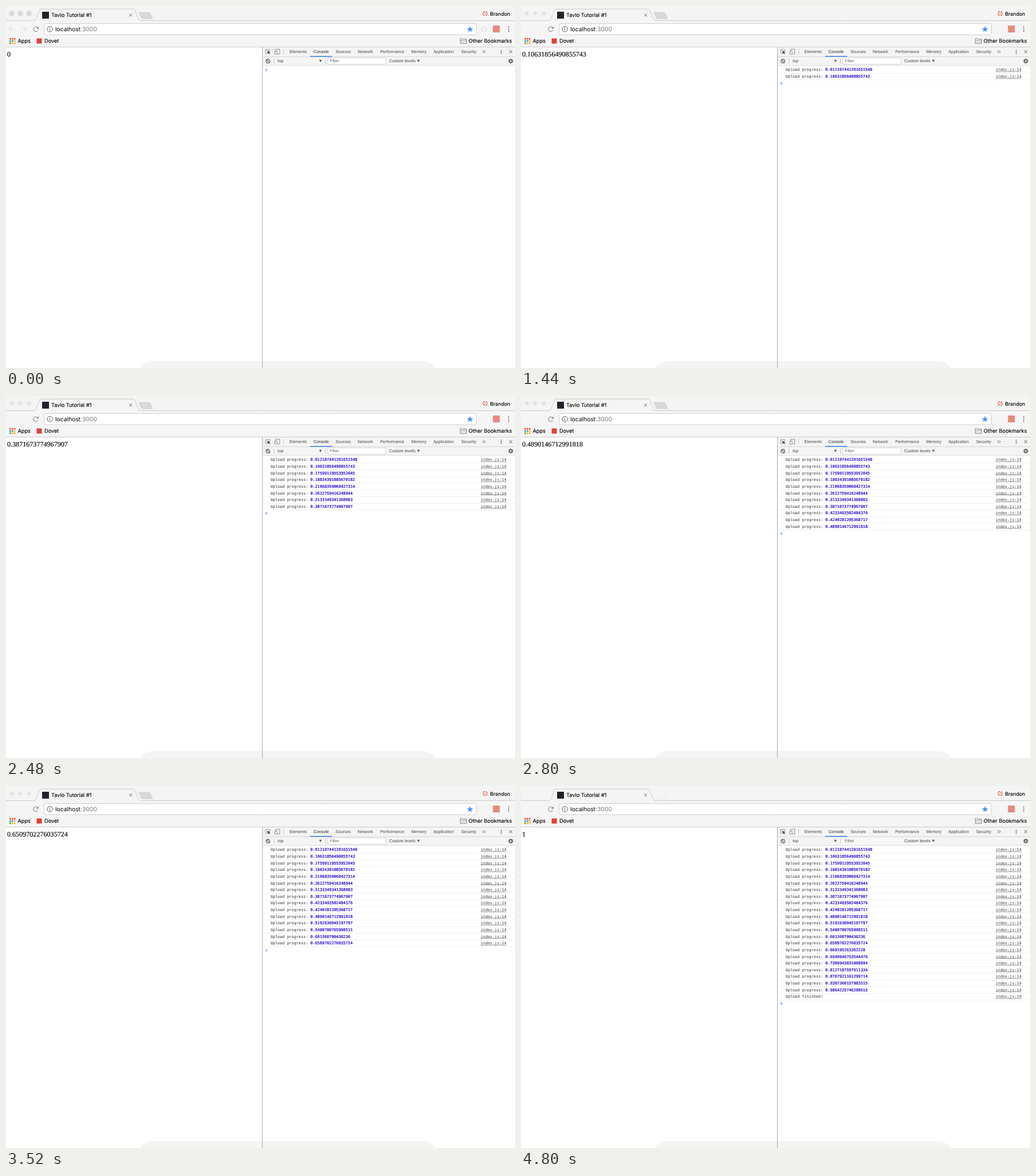
Write an HTML page with a canvas that moves like this. It is 888 px wide and 631 px high and loops after 4.96 s.

```html
<!DOCTYPE html>
<html lang="en">
<head>
<meta charset="utf-8">
<title>Upload progress</title>
<style>
html, body { margin: 0; width: 100%; height: 100%; overflow: hidden; background: #fff; }
canvas, svg { position: absolute; left: 0; top: 0; width: 888px; height: 631px; display: block; }
text { white-space: pre; text-rendering: geometricPrecision; }
.ui { font-family: Inter, sans-serif; font-size: 9.2px; stroke: #000; stroke-width: 0.12px; }
.url { font-family: Inter, sans-serif; font-size: 10.3px; }
.user { font-family: Inter, sans-serif; font-size: 8.8px; stroke: #000; stroke-width: 0.12px; }
.dev { font-family: "Liberation Sans", Arial, sans-serif; font-size: 7.3px; fill: #444; }
.log { font-family: "DejaVu Sans Mono", monospace; font-size: 6.8px; fill: #303030; }
.link { fill: #444; }
.num { fill: #1c00cf; stroke: #1c00cf; stroke-width: 0.22px; }
.page { font-family: "Liberation Serif", Times, serif; font-size: 12.1px; stroke: #000; stroke-width: 0.15px; }
</style>
</head>
<body>
<canvas id="stage"></canvas>
<svg id="words" viewBox="0 0 888 631"></svg>
<script>
const W = 888, H = 631, LOOP = 4960, ROW = 11.636;
const LEAD = 80;      // the page runs ahead of the console for the first two values
const AWAKE = 960, FADE = 3600;

const values = [
  '0.012107441201651548', '0.10631856490855743', '0.17599119553952045', '0.18834391085670182',
  '0.21068359060427314', '0.2622759416248944', '0.3133349341368083', '0.3871673774967907',
  '0.4233493502484376', '0.4240281205368717', '0.4890146712991818', '0.5192630945197797',
  '0.5480780765908511', '0.601360700436236', '0.6509702276035724', '0.669195263362228',
  '0.6949946753544476', '0.7309943031808894', '0.8127187597911334', '0.8767921161299714',
  '0.9387360157983515', '0.9864225746208615', '1'
];
const times = [
  1040, 1440, 1760, 1760, 1840, 2000, 2160, 2480, 2560, 2560, 2800, 2960,
  3120, 3360, 3520, 3600, 3680, 3840, 4080, 4320, 4480, 4640, 4800
];

const canvas = document.getElementById('stage');
const words = document.getElementById('words');
const ctx = canvas.getContext('2d');
const ratio = window.devicePixelRatio || 1;
canvas.width = W * ratio;
canvas.height = H * ratio;

// ---- text ----
function el(name, attrs, parent, content) {
  const node = document.createElementNS('http://www.w3.org/2000/svg', name);
  for (const key in attrs) node.setAttribute(key, attrs[key]);
  if (content) node.textContent = content;
  parent.appendChild(node);
  return node;
}

function label(cls, x, y, content, fill) {
  const node = el('text', { class: cls, x, y }, words, content);
  if (fill) node.style.fill = fill;
  return node;
}

label('ui', 79, 18.9, 'Tavlo Tutorial #1');
label('user', 844.5, 16.5, 'Brandon');
const url = label('url', 86, 44.2, 'localhost');
el('tspan', { fill: '#777' }, url, ':3000');
label('ui', 20.5, 64.4, 'Apps');
label('ui', 67, 64.4, 'Dovet');
label('ui', 807, 64.4, 'Other Bookmarks');

[['Elements', 494.5], ['Console', 536.3], ['Sources', 575], ['Network', 613.6],
 ['Performance', 653], ['Memory', 707], ['Application', 745.5], ['Security', 794]]
  .forEach(([name, x]) => label('dev', x, 81.7, name, name === 'Console' ? '#222' : ''));
label('dev', 474, 98.3, 'top');
label('dev', 565, 98.3, 'Filter', '#666');
label('dev', 668.5, 98.3, 'Custom levels');

const pageText = label('page', 2, 88.4, '0');

const rows = values.map((value, i) => {
  const last = i === values.length - 1;
  const y = 113.4 + i * ROW;
  const row = el('g', {}, words);
  const line = el('text', { class: 'log', x: 461.5, y }, row, last ? 'Upload finished!' : 'Upload progress: ');
  if (!last) el('tspan', { class: 'num' }, line, value);
  el('text', { class: 'log link', x: 828, y }, row, 'index.js:' + (last ? 19 : 14));
  return row;
});

// ---- shapes ----
function box(x, y, w, h, color) {
  ctx.fillStyle = color;
  ctx.fillRect(x, y, w, h);
}

function stroke(color, width) {
  ctx.strokeStyle = color;
  ctx.lineWidth = width;
  ctx.stroke();
}

function path(points, color, width = 1, close = false) {
  ctx.beginPath();
  points.forEach(([x, y]) => ctx.lineTo(x, y));
  if (close) ctx.closePath();
  stroke(color, width);
}

function shape(points, color) {
  ctx.beginPath();
  points.forEach(([x, y]) => ctx.lineTo(x, y));
  ctx.closePath();
  ctx.fillStyle = color;
  ctx.fill();
}

function dot(x, y, r, color) {
  ctx.beginPath();
  ctx.arc(x, y, r, 0, 7);
  ctx.fillStyle = color;
  ctx.fill();
}

function arc(x, y, r, from, to, color, width) {
  ctx.beginPath();
  ctx.arc(x, y, r, from, to);
  stroke(color, width);
}

function round(x, y, w, h, r, fill, edge) {
  ctx.beginPath();
  ctx.roundRect(x, y, w, h, r);
  ctx.fillStyle = fill;
  ctx.fill();
  if (edge) stroke(edge, 1);
}

function cross(x, y, r, color, width) {
  path([[x - r, y - r], [x + r, y + r]], color, width);
  path([[x + r, y - r], [x - r, y + r]], color, width);
}

function dots(x, y, gap, r, color) {
  for (let i = -1; i <= 1; i++) dot(x, y + i * gap, r, color);
}

function tabStrip(t) {
  box(0, 0, W, 72, '#f4f4f4');
  box(0, 26, W, 45, '#f5f5f5');

  if (t < FADE) {
    for (const x of [10, 25, 40]) {
      if (t < AWAKE) {
        dot(x, 13, 4.8, '#d9d9d9');
      } else {
        arc(x, 13, 4.5, 0, 7, '#e9e9e9', 0.8);
        dot(x, 13, 2.7, '#dedede');
      }
    }
  }

  ctx.beginPath();
  ctx.moveTo(0, 25.5);
  ctx.lineTo(49, 25.5);
  ctx.quadraticCurveTo(51.5, 25, 52.5, 22.5);
  ctx.lineTo(58, 8);
  ctx.quadraticCurveTo(59, 5.2, 62, 5.2);
  ctx.lineTo(221, 5.2);
  ctx.quadraticCurveTo(224, 5.2, 225, 8);
  ctx.lineTo(231, 22.5);
  ctx.quadraticCurveTo(232, 25.5, 235, 25.5);
  ctx.lineTo(W, 25.5);
  stroke('#cbcbcb', 1);

  box(63, 10, 12, 12, '#20232a');
  cross(217.5, 15.8, 2.4, '#666', 1);

  const spare = [[231.5, 11], [250, 11], [252, 12.5], [256, 22.5], [238.5, 22.5], [236, 21.3]];
  if (t < FADE) {
    shape(spare, '#d8d8d8');
    path(spare, '#cdcdcd', 0.5, true);
  } else {
    path(spare.slice(1), '#e3e3e3', 0.7);
  }

  // sync warning
  const red = '#dd4b3e';
  arc(836, 13, 3.7, 2, 4, red, 1);
  arc(836, 13, 3.7, -1.1, 0.9, red, 1);
  path([[838.6, 9], [833.4, 17]], red, 0.9);
  shape([[832.6, 9], [835.2, 9], [835, 11.6]], red);
  shape([[839.4, 17], [836.8, 17], [837, 14.4]], red);
}

function toolbar(t) {
  if (t < AWAKE) {
    for (const [x, d] of [[10, -1], [31, 1]]) {
      path([[x - 4.5, 40], [x + 4.5, 40]], '#dcdcdc', 1.1);
      path([[x + d * 0.5, 36], [x + d * 4.5, 40], [x + d * 0.5, 44]], '#dcdcdc', 1.1);
    }
    arc(834, 40.3, 4, 2, 4.5, '#dadada', 1.4);
    arc(834, 40.3, 4, -1.1, 1.4, '#dadada', 1.4);
  } else if (t < FADE) {
    for (const [x, y] of [[830, 42], [834, 44], [838, 38.5]]) dot(x, y, 0.6, '#dedede');
  }

  arc(52, 40.3, 4.2, 0.5, 5.5, '#777', 1);
  shape([[56.8, 35.7], [56.8, 39.4], [53.1, 39.4]], '#777');

  round(66.5, 30.5, 754, 19.5, 2.5, '#fff', '#cfcfcf');
  arc(76.5, 40.3, 4.7, 0, 7, '#555', 1);
  box(76, 39.5, 1, 3.4, '#555');
  box(76, 37.5, 1, 1.1, '#555');

  const star = [];
  for (let i = 0; i < 10; i++) {
    const r = i % 2 ? 2.4 : 5.9, a = -Math.PI / 2 + i * Math.PI / 5;
    star.push([809.5 + r * Math.cos(a), 40.7 + r * Math.sin(a)]);
  }
  shape(star, '#4a94f4');
  box(849.5, 34, 12, 12, '#e58a80');
  dots(877, 40.3, 3.8, 1.1, '#707070');

  // bookmarks
  const grid = ['#e84d3d', '#e84d3d', '#e84d3d', '#3fa757', '#4285f4', '#f2b32a', '#3fa757', '#f2b32a', '#f2b32a'];
  grid.forEach((color, i) => box(6 + (i % 3) * 3.9, 55.8 + Math.floor(i / 3) * 3.9, 2.7, 2.7, color));
  box(53.5, 56.5, 9, 9, '#dc4437');

  path([[792.5, 56.5], [796.5, 56.5], [797.5, 57.5], [803.5, 57.5], [803.5, 65.5], [792.5, 65.5]], '#888', 0.9, true);
  box(793, 58.2, 10, 6.9, '#dfdfdf');
  box(793, 59.3, 10, 0.7, '#999');
  box(0, 71, W, 1, '#cbcbcb');
}

function devtools(t) {
  box(448, 72, 440, 32, '#f4f4f4');
  box(448, 87.8, 440, 0.9, '#d2d2d2');
  box(448, 103.3, 440, 0.9, '#dcdcdc');
  box(530.5, 87, 38.5, 1.6, '#3f86ee');

  // inspect and device buttons
  path([[456, 82.8], [453, 82.8], [453, 76], [460.5, 76], [460.5, 78.5]], '#777', 0.8);
  shape([[455.5, 78], [461.4, 80.3], [459.2, 81.2], [461, 83.2], [460, 84], [458.2, 82], [457.2, 84]], '#444');
  path([[470.5, 78], [470.5, 75.3], [477.6, 75.3], [477.6, 83.8], [474, 83.8]], '#777', 0.8);
  path([[469, 78.5], [473, 78.5], [473, 84], [469, 84]], '#777', 0.8, true);
  box(484, 75, 0.8, 9.5, '#c4c4c4');

  for (const x of [831.5, 834.4]) path([[x, 77.4], [x + 2, 79.7], [x, 82]], '#555', 0.9);
  dots(864, 79.7, 2.7, 0.85, '#555');
  cross(880.6, 79.7, 2.6, '#555', 1);

  arc(457, 96.2, 3.3, 0, 7, '#555', 1.1);
  path([[454.8, 94], [459.2, 98.4]], '#555', 1.1);
  box(467.4, 91.5, 0.8, 9.5, '#c4c4c4');
  box(557, 91.5, 0.8, 9.5, '#c4c4c4');
  for (const x of [548.6, 719.5]) shape([[x - 2.3, 93.8], [x + 2.3, 93.8], [x, 98]], '#555');

  if (t < FADE) round(561.5, 90.5, 101.5, 11, 0, '#fff', '#d6d6d6');
  else box(561, 90, 102.5, 12, '#f7f7f7');

  for (let i = 0; i < 8; i++) {
    const a = i * Math.PI / 4, c = Math.cos(a), s = Math.sin(a);
    path([[880.6 + 2.4 * c, 96 + 2.4 * s], [880.6 + 4.3 * c, 96 + 4.3 * s]], '#555', 1.5);
  }
  arc(880.6, 96, 2.3, 0, 7, '#555', 1.4);
}

function consoleRows(count) {
  for (let i = 0; i < count; i++) {
    box(448, 116.7 + i * ROW, 440, 0.8, '#ededed');
    box(828, 114.2 + i * ROW, 45, 0.6, '#555');
  }
  const y = 111.6 + count * ROW;
  path([[453, y - 2], [455.2, y], [453, y + 2]], '#3b87e8', 1.1);
}

function draw(t) {
  const logged = times.filter(at => t >= at).length;
  const shown = times.filter((at, i) => t >= at - (i < 2 ? LEAD : 0)).length;

  ctx.setTransform(ratio, 0, 0, ratio, 0, 0);
  box(0, 0, W, H, '#fff');
  tabStrip(t);
  toolbar(t);
  devtools(t);
  consoleRows(logged);
  round(230, 619, 523, 50, 25, '#f4f4f4');
  box(446.8, 72, 1, H - 72, '#a9a9a9');

  const value = shown ? values[shown - 1] : '0';
  if (pageText.textContent !== value) pageText.textContent = value;
  rows.forEach((row, i) => { row.style.display = i < logged ? '' : 'none'; });
}

const start = performance.now();
function tick() {
  draw((performance.now() - start) % LOOP);
  requestAnimationFrame(tick);
}
tick();
</script>
</body>
</html>
```
